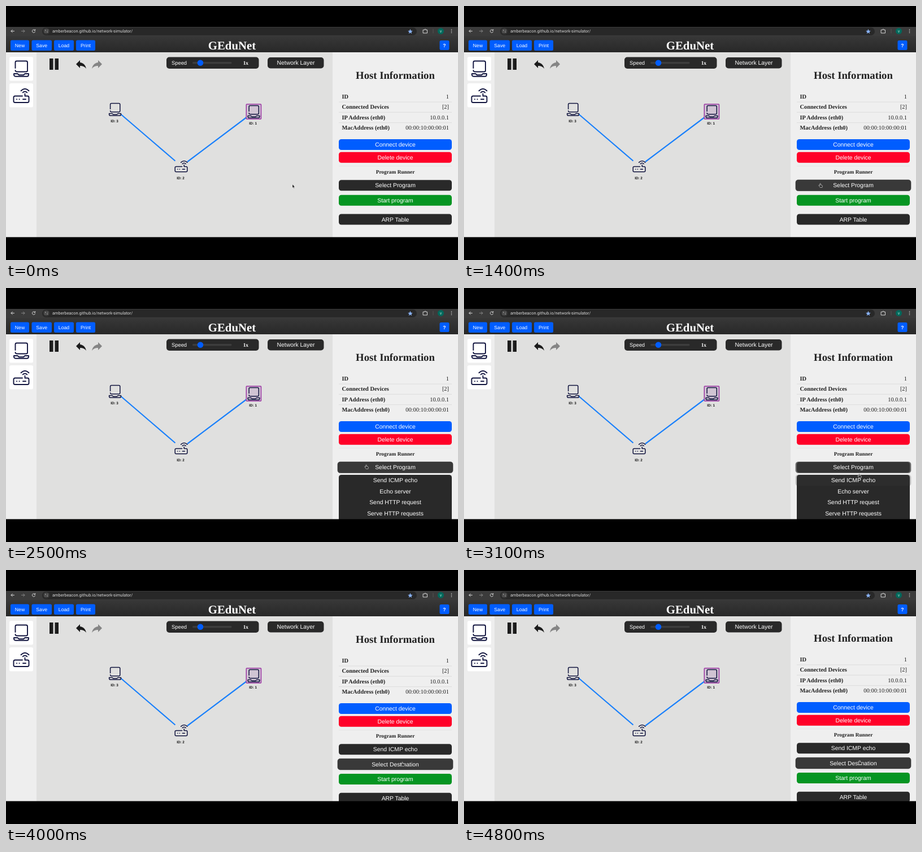
Write an HTML page that moves like this. It is 800 px wide and 450 px high and loops after 5 s.

```html
<!DOCTYPE html>
<html lang="en">
<head>
<meta charset="utf-8">
<title>Network simulator</title>
<style>
html, body { margin: 0; width: 100%; height: 100%; overflow: hidden; background: #000; }
svg { display: block; width: 800px; height: 450px; }
text { text-rendering: geometricPrecision; }

.sans { font-family: "Liberation Sans", Arial, sans-serif; }
.serif { font-family: "Liberation Serif", "Times New Roman", serif; }
.ui { font-family: Roboto, sans-serif; }
.bold { font-weight: 700; }
.mid { text-anchor: middle; }
.end { text-anchor: end; }
.s10 { font-size: 10.4px; }
.s9 { font-size: 9.36px; }
.s8 { font-size: 8.67px; }
.id { font-size: 6.3px; }
.ink { fill: #202020; }
.light { fill: #fff; }
.dark { fill: #292929; }
.blue { fill: #005dff; }
.hot { fill: #393939; stroke: #2a2a2a; stroke-width: .6; }
.icon { fill: none; stroke: #12153f; stroke-width: 1.9; stroke-linecap: round; stroke-linejoin: round; }
.chrome { fill: none; stroke: #d4d4d4; stroke-width: 1; stroke-linecap: round; stroke-linejoin: round; }

.arrow, .hand, .list, .tail, .dest, .before, .after, .panel, .hot-select, .hot-echo {
  animation: 5s step-end infinite;
}
.arrow { animation-name: arrow; }
.hand { animation-name: hand; }
.list { animation-name: list; }
.tail { animation-name: tail; }
.dest, .after { animation-name: after; }
.before { animation-name: before; }
.panel { animation-name: scroll; }
.hot-select { animation-name: hot-select; animation-timing-function: linear; }
.hot-echo { animation-name: hot-echo; animation-timing-function: linear; }

@keyframes arrow {
  0% { transform: translate(507px, 316px); visibility: visible; }
  22% { transform: translate(559px, 319px); visibility: visible; }
  24%, 100% { visibility: hidden; }
}
@keyframes hand {
  0% { visibility: hidden; transform: translate(600px, 321px); }
  24% { visibility: visible; transform: translate(600px, 321px); }
  26% { visibility: visible; transform: translate(620px, 319px); }
  28% { visibility: visible; transform: translate(631px, 318px); }
  30% { visibility: visible; transform: translate(636px, 317.5px); }
  32% { visibility: visible; transform: translate(638px, 317px); }
  52% { visibility: visible; transform: translate(648px, 318px); }
  54% { visibility: visible; transform: translate(664px, 320px); }
  56% { visibility: visible; transform: translate(680px, 322px); }
  58% { visibility: visible; transform: translate(692px, 324px); }
  60% { visibility: visible; transform: translate(698px, 326px); }
  62% { visibility: visible; transform: translate(700px, 333px); }
  64% { visibility: visible; transform: translate(701px, 339px); }
  66% { visibility: visible; transform: translate(702px, 342px); }
  70% { visibility: visible; transform: translate(702px, 344px); }
  84% { visibility: visible; transform: translate(701px, 343px); }
  88% { visibility: visible; transform: translate(700px, 342px); }
  94%, 100% { visibility: visible; transform: translate(700.5px, 341px); }
}
@keyframes list {
  0% { visibility: hidden; }
  40% { visibility: visible; }
  78%, 100% { visibility: hidden; }
}
@keyframes tail {
  0% { visibility: visible; transform: translateY(0); }
  40% { visibility: hidden; transform: translateY(0); }
  78%, 100% { visibility: visible; transform: translateY(26.3px); }
}
@keyframes after {
  0% { visibility: hidden; }
  78%, 100% { visibility: visible; }
}
@keyframes before {
  0% { visibility: visible; }
  78%, 100% { visibility: hidden; }
}
@keyframes scroll {
  0% { transform: translateY(0); }
  86% { transform: translateY(-.5px); }
  88% { transform: translateY(-1px); }
  90% { transform: translateY(-1.3px); }
  92% { transform: translateY(-1.6px); }
  94% { transform: translateY(-1.8px); }
  96%, 100% { transform: translateY(-2px); }
}
@keyframes hot-select {
  0%, 23% { opacity: 0; }
  27%, 61% { opacity: 1; }
  65%, 100% { opacity: 0; }
}
@keyframes hot-echo {
  0%, 61% { opacity: 0; }
  65%, 77.9% { opacity: 1; }
  78%, 100% { opacity: 0; }
}
</style>
</head>
<body>
<svg viewBox="0 0 800 450" xmlns="http://www.w3.org/2000/svg">
  <defs>
    <linearGradient id="head" x1="0" y1="0" x2="0" y2="1">
      <stop offset="0" stop-color="#383838"/>
      <stop offset="1" stop-color="#282828"/>
    </linearGradient>
    <g id="host">
      <path d="M4.5 15V5Q4.5 2.5 7 2.5H23.500Q26 2.500 26 5V19.500Q26 21.500 23.500 21.500H7.500Q4.500 21.500 4.500 19"/>
      <path d="M2 25H8.500L11 27.200H19L21.500 25H28V26.500Q28 29.800 25 29.800H5Q2 29.800 2 26.500Z"/>
    </g>
    <g id="router">
      <path d="M17 14.500H4Q1.500 14.500 1.500 17V23.500Q1.500 26 4 26H26Q28.500 26 28.500 23.500V17Q28.500 14.500 26 14.500H21.500V10.500"/>
      <path d="M7 20.300H7.200M11.500 20.300H11.700M18 20.300H23"/>
      <path d="M17.800 8.300Q21.500 4.800 25.200 8.300M14.500 5.200Q21.500 -1.500 28.500 5.200"/>
    </g>
    <path id="reply" d="M10 9V5L3 12L10 19V14.900C15 14.900 18.500 16.500 21 20C20 15 17 10 10 9Z"/>
    <rect id="btn" x="589" width="200" height="19" rx="4.500"/>
    <rect id="hotbtn" x="587" width="204" height="19.600" rx="4.500"/>
  </defs>

  <rect width="800" height="450"/>

  <!-- browser bar -->
  <rect y="37" width="800" height="16" fill="#3b3b3b"/>
  <rect x="64" y="38" width="663" height="14" rx="7" fill="#282828"/>
  <g class="chrome">
    <path d="M14.500 44.500H9M11.500 42L9 44.500L11.500 47"/>
    <path d="M27.500 44.500H33M30.500 42L33 44.500L30.500 47" stroke="#858585"/>
    <path d="M51.300 43A2.700 2.700 0 1 0 51.600 45.500M51.700 41.500V43.300H49.800"/>
    <circle cx="71.500" cy="44.500" r="5.500" fill="#3c3c3c" stroke="none"/>
    <path d="M69 43H71M73.500 43H74M69 46H69.500M72 46H74" stroke-width=".9"/>
    <path d="M738.500 42.300H741V41.300H743V42.300H745.500V48H738.500Z"/>
    <path d="M756 41V48" stroke="#555"/>
  </g>
  <path d="M715.500 40.800L716.700 43.700L719.800 43.900L717.400 45.900L718.200 49L715.500 47.300L712.800 49L713.600 45.900L711.200 43.900L714.300 43.700Z" fill="#8ab4f8"/>
  <circle cx="769.500" cy="44.500" r="5.500" fill="#00695c"/>
  <text class="ui mid" x="769.500" y="46.600" font-size="5.500" fill="#dfe">V</text>
  <g fill="#d4d4d4">
    <circle cx="788.500" cy="41.700" r=".8"/><circle cx="788.500" cy="44.500" r=".8"/><circle cx="788.500" cy="47.300" r=".8"/>
  </g>
  <text class="ui" x="82" y="47.200" font-size="7.450" fill="#d8d8d8">amberbeacon.github.io/network-simulator/</text>

  <!-- page header -->
  <rect y="53" width="800" height="29" fill="url(#head)"/>
  <g class="blue">
    <rect x="8" y="60.500" width="33" height="18.500" rx="2.500"/>
    <rect x="45.500" y="60.500" width="35.500" height="18.500" rx="2.500"/>
    <rect x="85" y="60.500" width="35" height="18.500" rx="2.500"/>
    <rect x="124" y="60.500" width="34" height="18.500" rx="2.500"/>
    <rect x="767.500" y="61" width="17" height="17" rx="2.500"/>
  </g>
  <g class="sans mid s8 light">
    <text x="24.500" y="72.500">New</text>
    <text x="63.200" y="72.500">Save</text>
    <text x="102.500" y="72.500">Load</text>
    <text x="141" y="72.500">Print</text>
    <text class="bold" x="776" y="72.700">?</text>
  </g>
  <text class="serif bold mid light" x="400" y="77" font-size="20.800">GEduNet</text>

  <!-- workspace -->
  <rect y="82" width="54" height="328" fill="#eee"/>
  <rect x="54" y="82" width="524" height="328" fill="#e0e0df"/>
  <rect x="6" y="90" width="42" height="42.500" rx="3" fill="#fff"/>
  <rect x="6" y="137" width="42" height="42.500" rx="3" fill="#fff"/>
  <g class="icon">
    <use href="#host" x="12" y="95"/>
    <use href="#router" x="12" y="145"/>
  </g>

  <path d="M77 93H83.500V113H77ZM86.500 93H93V113H86.500Z" fill="#1c1c1c"/>
  <use href="#reply" transform="translate(121 91)" fill="#1c1c1c"/>
  <use href="#reply" transform="translate(173 91) scale(-1 1)" fill="#858585"/>

  <rect class="dark" x="284" y="90.500" width="163.500" height="20.500" rx="5"/>
  <text class="sans s9 light" x="293" y="104">Speed</text>
  <rect x="330" y="99" width="69.500" height="3.500" rx="1.750" fill="#3d3d3d"/>
  <circle class="blue" cx="344" cy="100.700" r="5.300"/>
  <text class="serif bold mid s9 light" x="424.300" y="104">1x</text>
  <rect class="dark" x="463" y="91" width="99.500" height="19.500" rx="5"/>
  <text class="sans mid s10 light" x="513" y="104.300">Network Layer</text>

  <path d="M203.500 192L299.500 274.500M321 276L428 195.500" fill="none" stroke="#1a80fb" stroke-width="2.200"/>
  <rect x="425.300" y="174" width="26.200" height="26.200" rx="1" fill="#d0c4d3" stroke="#9a35a2" stroke-width="1.500"/>
  <g class="icon">
    <use href="#host" transform="translate(181 170.500) scale(.8)"/>
    <use href="#host" transform="translate(426.500 174.500) scale(.8)"/>
    <use href="#router" transform="translate(298 273) scale(.8)"/>
  </g>
  <g class="sans bold mid id" fill="#111">
    <text x="192" y="206">ID: 3</text>
    <text x="437.200" y="210">ID: 1</text>
    <text x="309" y="307">ID: 2</text>
  </g>

  <!-- side panel -->
  <rect x="578" y="82" width="222" height="328" fill="#efefef"/>
  <g class="panel">
    <text class="serif bold mid ink" x="689" y="129" font-size="18.720">Host Information</text>
    <g class="serif bold s10 ink">
      <text x="594.500" y="163.700">ID</text>
      <text x="594.500" y="182">Connected Devices</text>
      <text x="594.500" y="200.500">IP Address (eth0)</text>
      <text x="594.500" y="219">MacAddress (eth0)</text>
    </g>
    <g class="serif end s10 ink">
      <text x="784" y="163.700">1</text>
      <text x="784" y="182">[2]</text>
      <text x="784" y="200.500">10.0.0.1</text>
      <text x="784" y="219">00:00:10:00:00:01</text>
    </g>
    <path d="M589 170H789M589 188.300H789M589 206.700H789" stroke="#d9d9d9" stroke-width=".8"/>
    <path d="M589 283.500H789" stroke="#e2e2e2" stroke-width=".8"/>
    <use href="#btn" class="blue" y="236"/>
    <use href="#btn" y="258.700" fill="#ff0028"/>
    <text class="serif bold mid s9 ink" x="689" y="297">Program Runner</text>
    <use href="#btn" class="dark" y="308.300"/>
    <use href="#hotbtn" class="hot hot-select" y="308"/>
    <g class="sans mid s10 light">
      <text x="689" y="249">Connect device</text>
      <text x="689" y="271.500">Delete device</text>
      <text class="before" x="689" y="321.300">Select Program</text>
      <text class="after" x="689" y="321.300">Send ICMP echo</text>
    </g>

    <g class="list">
      <rect class="dark" x="589" y="331" width="200" height="90" rx="4.500"/>
      <use href="#hotbtn" class="hot hot-echo" y="331"/>
      <g class="sans mid s10 light">
        <text x="689" y="344.200">Send ICMP echo</text>
        <text x="689" y="363.800">Echo server</text>
        <text x="689" y="383.400">Send HTTP request</text>
        <text x="689" y="403">Serve HTTP requests</text>
      </g>
    </g>

    <g class="dest">
      <use href="#hotbtn" class="hot" y="334.300"/>
      <text class="sans mid s10 light" x="689" y="347.700">Select Destination</text>
    </g>

    <g class="tail">
      <use href="#btn" y="334.700" fill="#069522"/>
      <use href="#btn" class="dark" y="368.500"/>
      <g class="sans mid s10 light">
        <text x="689" y="347.800">Start program</text>
        <text x="689" y="381.600">ARP Table</text>
      </g>
    </g>
  </g>
  <rect y="409.500" width="800" height="40.500"/>

  <path class="arrow" d="M0 0V6L1.400 4.900L2.300 7L3.300 6.500L2.400 4.600L4.200 4.400Z" fill="#1a1a1a" stroke="#f4f4f4" stroke-width=".4"/>
  <path class="hand" d="M-1.400 2.200L-3 .4Q-3.400 -.8 -2.200 -.7L-1.200 .2V-3.200Q-.4 -4.200 .4 -3.200V-.9L2.500 -.4Q3.400 -.1 3.300 .9L2.800 3.600H-.6Z" fill="#2a2a2a" stroke="#dcdcdc" stroke-width=".7" stroke-linejoin="round"/>
</svg>
</body>
</html>
```
